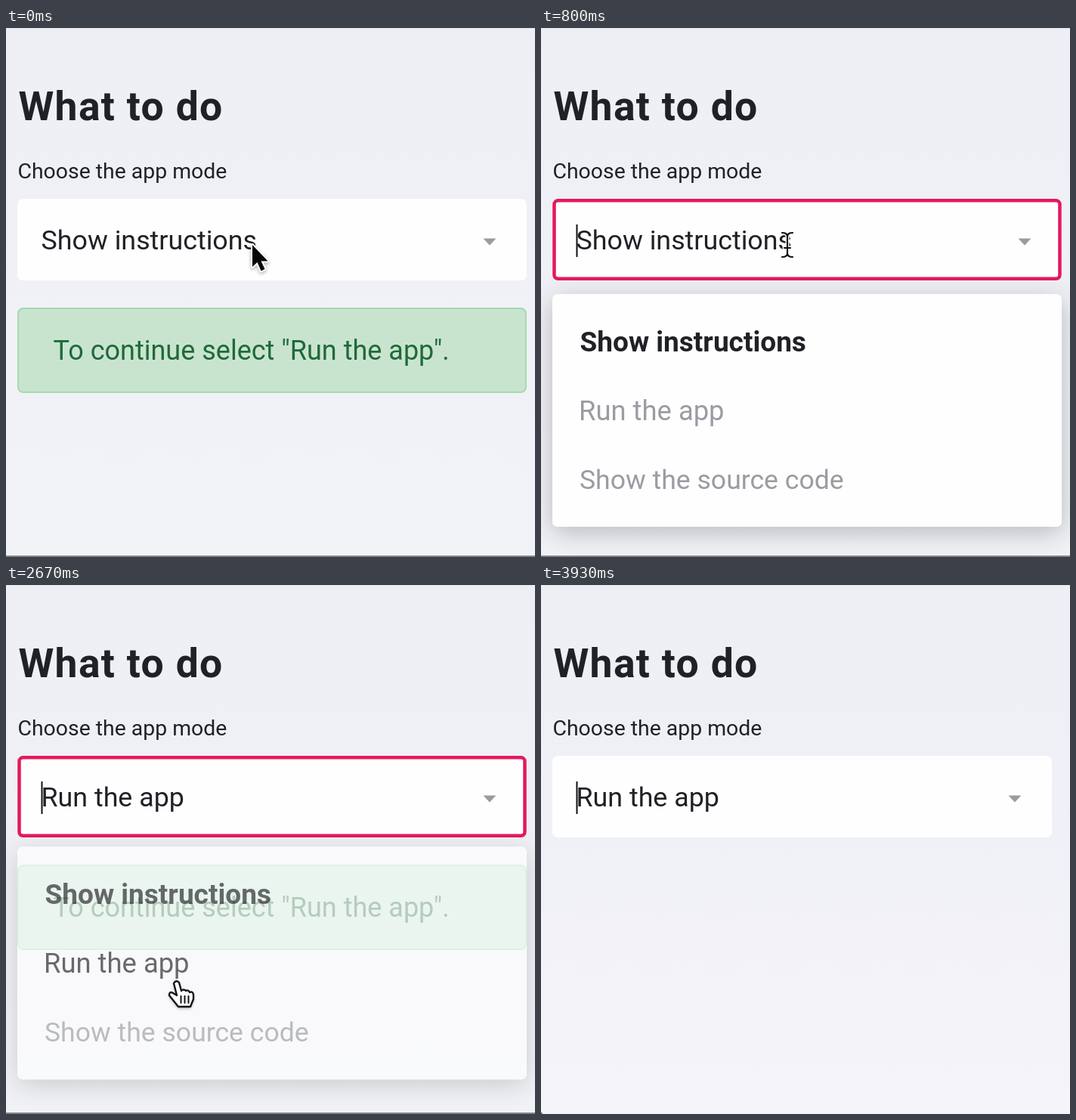
An HTML page with a canvas for the animation above (3990 ms loop, 700 px wide and 700 px high).

```html
<!DOCTYPE html>
<html lang="en">
<head>
<meta charset="utf-8">
<title>App mode</title>
<style>
html, body { margin: 0; width: 100%; height: 100%; overflow: hidden; background: #eff0f5; }
canvas { display: block; width: 700px; height: 700px; }
</style>
</head>
<body>
<canvas id="stage" width="700" height="700"></canvas>
<script>
const ctx = document.getElementById('stage').getContext('2d');
const LOOP = 3990, STEP = 200 / 3;
const INK = '#202126', MUTED = '#9b9ca2', PINK = '#e6185b';
const OPEN = 470, CLICK = 2660, RERUN = 2795;

// Pointer path: time, x, y
const PATH = [
  [1200, 326, 287], [1333, 323, 340], [1467, 317, 417],
  [1733, 272, 499], [1933, 236, 520], [2133, 226, 525]
];

const clamp = v => Math.min(1, Math.max(0, v));
const ramp = (t, start, length) => clamp((t - start) / length);
const easeOut = v => 1 - (1 - v) ** 2;

function pointer(t) {
  if (t <= PATH[0][0]) return PATH[0].slice(1);
  for (let i = 1; i < PATH.length; i++) {
    const [t0, x0, y0] = PATH[i - 1], [t1, x1, y1] = PATH[i];
    if (t < t1) {
      const p = (t - t0) / (t1 - t0);
      return [x0 + (x1 - x0) * p, y0 + (y1 - y0) * p];
    }
  }
  return PATH[PATH.length - 1].slice(1);
}

function text(str, x, y, size, color, weight = 400, spacing = 0) {
  ctx.font = `${weight} ${size}px Roboto, "Noto Sans", sans-serif`;
  ctx.letterSpacing = spacing + 'px';
  ctx.fillStyle = color;
  ctx.fillText(str, x, y);
}

function box(x, y, w, h, r) {
  ctx.beginPath();
  ctx.roundRect(x, y, w, h, r);
}

function background(t) {
  const g = ctx.createLinearGradient(0, 0, 0, 700);
  g.addColorStop(0, '#eeeff4');
  g.addColorStop(0.5, '#f0f1f6');
  g.addColorStop(1, t > 3060 ? '#f5f4f9' : '#f1f3f7');
  ctx.fillStyle = g;
  ctx.fillRect(0, 0, 700, 700);
  ctx.fillStyle = '#e4e5ea';
  ctx.fillRect(0, 0, 700, 1);
  ctx.fillStyle = '#85868a';
  ctx.fillRect(0, 698, t < RERUN ? 700 : 2, 2);
}

function alertBox() {
  box(16, 371, 672, 111, 7);
  ctx.fillStyle = '#c8e4cf';
  ctx.fill();
  ctx.lineWidth = 2;
  ctx.strokeStyle = '#a5daaf';
  ctx.stroke();
  text('To continue select "Run the app".', 62.5, 439, 36, '#20693a');
}

function menu(alpha, dy, hover) {
  const y = 352 + dy;
  ctx.save();
  ctx.globalAlpha = alpha;

  // Shadow only outside the panel
  ctx.save();
  ctx.beginPath();
  ctx.rect(0, 0, 700, 700);
  ctx.roundRect(15, y, 674, 308, 7);
  ctx.clip('evenodd');
  ctx.shadowColor = 'rgba(0,0,0,0.24)';
  ctx.shadowBlur = 34;
  ctx.shadowOffsetY = 8;
  ctx.fillStyle = '#fff';
  box(15, y, 674, 308, 7);
  ctx.fill();
  ctx.restore();

  ctx.fillStyle = '#fefeff';
  box(15, y, 674, 308, 7);
  ctx.fill();
  text('Show instructions', 51.5, 428 + dy, 37, INK, 700);
  text('Run the app', 50, 519 + dy, 36.4, hover ? INK : MUTED);
  text('Show the source code', 51, 610 + dy, 35.6, MUTED);
  ctx.restore();
}

function select(label, border, narrow, caret) {
  const w = 674 - narrow;
  ctx.fillStyle = '#fefeff';
  box(15, 226, w, 108, 7);
  ctx.fill();
  if (border > 0) {
    ctx.save();
    ctx.globalAlpha = border;
    ctx.strokeStyle = PINK;
    ctx.lineWidth = 4.5;
    box(17.5, 228.3, w - 5, 103.5, 5);
    ctx.stroke();
    ctx.restore();
  }
  text(label, 46.5, 293, 35.8, INK);

  const x = 640 - narrow;
  ctx.fillStyle = '#9a9a9f';
  ctx.beginPath();
  ctx.moveTo(x - 8.5, 278.5);
  ctx.lineTo(x + 8.5, 278.5);
  ctx.lineTo(x, 287.5);
  ctx.fill();

  if (caret) {
    ctx.fillStyle = '#111';
    ctx.fillRect(46.5, 260, 2, 43);
  }
}

const arrowShape = new Path2D('M0 0V29L6.5 23L11.5 34.5L16.5 32L11.5 21.5H20.5Z');
const beamShape = new Path2D('M-7 -16Q0 -16 0 -11V11Q0 16 -7 16M7 -16Q0 -16 0 -11M0 11Q0 16 7 16M-4 4H4');
const handShape = new Path2D('M-4 2Q-1 -3 3 1L6 12Q9 9 12 12Q15 10 17 14Q21 12 22 17V23L18 33H2L-10 18Q-10 12 -5 15L0 18Z');
const handLines = new Path2D('M5.5 19V28M10.5 19V28M15.5 19V28');

function cursor(x, y, kind) {
  const stroke = (shape, width, color) => {
    ctx.lineWidth = width;
    ctx.strokeStyle = color;
    ctx.stroke(shape);
  };
  ctx.save();
  ctx.translate(x, y);
  ctx.lineJoin = ctx.lineCap = 'round';
  if (kind === 'beam') {
    stroke(beamShape, 5, '#fff');
    stroke(beamShape, 2.2, '#111');
  } else {
    ctx.shadowColor = 'rgba(0,0,0,0.3)';
    ctx.shadowBlur = 4;
    ctx.shadowOffsetY = 2;
    if (kind === 'arrow') {
      stroke(arrowShape, 4, '#fff');
      ctx.shadowColor = 'transparent';
      ctx.fillStyle = '#080808';
      ctx.fill(arrowShape);
    } else {
      ctx.fillStyle = '#fff';
      ctx.fill(handShape);
      ctx.shadowColor = 'transparent';
      stroke(handShape, 2.4, '#151515');
      stroke(handLines, 2, '#151515');
    }
  }
  ctx.restore();
}

function draw(t) {
  const picked = t >= CLICK;
  const [x, y] = pointer(t);
  const closing = ramp(t, 2600, 200);
  const alpha = picked ? 1 - closing : ramp(t, OPEN, 110);
  const dy = -17 * (picked ? closing : 1 - easeOut(ramp(t, 533, 133)));
  const border = picked ? 1 - ramp(t, 2883, 156) : ramp(t, OPEN, 125);
  const caret = t >= 530 && Math.floor((t - 530) / 500) % 2 === 0;

  background(t);
  text('What to do', 16.5, 122, 53.5, INK, 700, 1.3);
  text('Choose the app mode', 15.5, 199, 28.4, INK);
  if (t < RERUN) alertBox();
  if (alpha > 0) menu(alpha, dy, y > 461);
  select(picked ? 'Run the app' : 'Show instructions', border, t > 3060 ? 13 : 0, caret);

  if (t < RERUN) {
    const kind = t < 525 || (y > 334 && y < 352) ? 'arrow' : y <= 334 ? 'beam' : 'hand';
    cursor(x, y, kind);
  }
}

const begin = performance.now();
function tick() {
  const t = (performance.now() - begin) % LOOP;
  draw(Math.min(59, Math.floor((t + 3.5) / STEP)) * STEP);
  requestAnimationFrame(tick);
}
tick();
</script>
</body>
</html>
```
